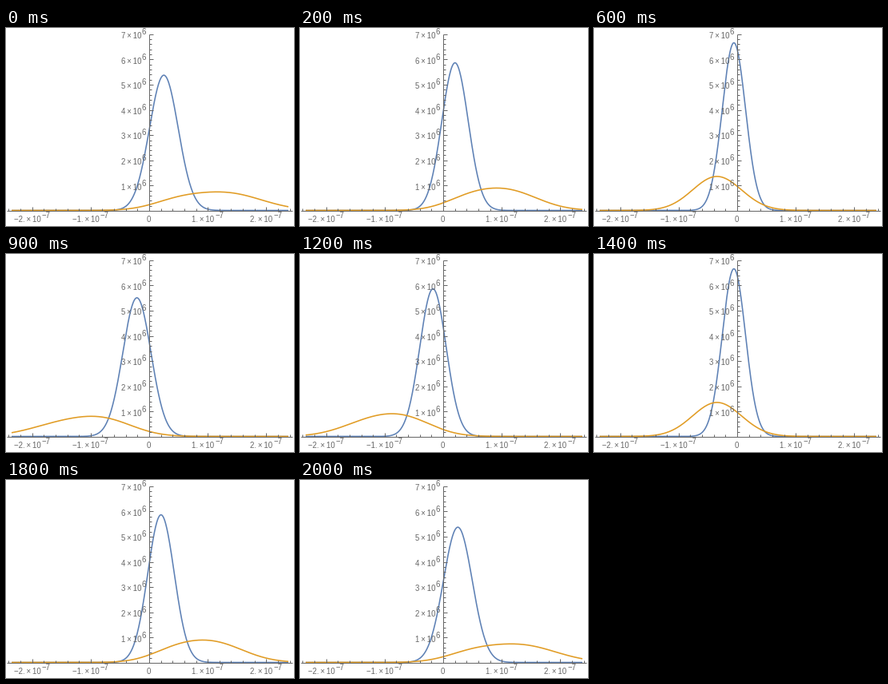
Animation, 360 px wide and 248 px high, one loop 2.1 s. Source, as a matplotlib script:

```python
import numpy as np
import matplotlib.pyplot as plt
from matplotlib.animation import FuncAnimation

W, H, DPI = 360, 248, 100
PT = 72 / DPI                      # points per pixel
X0, Y0 = 179.5, 228.5              # origin of the axes
XU, YU = 73.2, 31.6                # pixels per 1e-7 and per 1e6
FRAMES, STEP = 21, 100
GRAY, BLUE, GOLD = "#666666", "#5e81b5", "#e19c24"
THIN = "\u2009"

plt.rcParams["font.family"] = "Liberation Sans"
fig = plt.figure(figsize=(W / DPI, H / DPI), dpi=DPI, facecolor="white")
ax = fig.add_axes([0, 0, 1, 1])
ax.set(xlim=(0, W), ylim=(H, 0))
ax.axis("off")


def rule(xs, ys):
    """Draw a line one pixel wide, aligned to whole pixels."""
    ax.plot(np.floor(xs), np.ceil(ys), color=GRAY, lw=PT, zorder=3,
            snap=True, solid_capstyle="butt")


def label(x, y, text, align="left"):
    ax.text(x, y, text, size=9.7 * PT, color=GRAY, ha=align,
            va="baseline", zorder=4)


def power(x, y, mantissa, exponent):
    """Write mantissa x 10^exponent, with the mantissa ending at x."""
    label(x, y, f"{mantissa}{THIN}×{THIN}10", "right")
    label(x + 0.8, y - 5, exponent)


def draw_axes():
    rule([1, 358], [Y0, Y0])
    rule([X0, X0], [8, Y0])
    for i in range(-12, 13):
        x = X0 + i * XU / 5
        rule([x, x], [Y0, Y0 - (5 if i % 5 == 0 else 3)])
    for i in range(1, 36):
        y = Y0 - i * YU / 5
        rule([X0, X0 + (5 if i % 5 == 0 else 3)], [y, y])
    for n in range(1, 8):
        power(169, Y0 - n * YU + 5.7, n, "6")
    for n in (-2, -1, 1, 2):
        sign = "\u2212" if n < 0 else ""
        power(X0 + n * XU + (10.7 if n < 0 else 7.7), 242.7,
              f"{sign}{abs(n)}.", "\u22127")
    label(X0 - 0.8, 242.7, "0", "center")


def bell(x, area, mid, sd):
    return area / sd * np.exp(-((x - mid) / sd) ** 2 / 2)


def narrow(x, c):
    u = c * c
    height = 6.78 - 1.42 * u
    return bell(x, 96.5, c * (16.5 + 0.8 * u), 96.5 / height)


def wide(x, c):
    """Two packets that spread apart towards the turning points."""
    u = c * c
    area = 41.2 - 2 * u
    inner = 0.34 - 0.1 * c
    return (bell(x, area * (1 - inner), 103.5 * c - 7.5 * u, 27.5 + 16.5 * u)
            + bell(x, area * inner, 44 * c - 11 * u, 28 + 6 * u - 2 * c))


draw_axes()
xs = np.linspace(-173, 173, 693)
style = dict(lw=1.6 * PT, solid_capstyle="butt", solid_joinstyle="round")
blue, = ax.plot([], [], color=BLUE, zorder=1, **style)
gold, = ax.plot([], [], color=GOLD, zorder=2, **style)


def update(k):
    c = np.cos(2 * np.pi * k / (FRAMES - 1))
    for line, curve in ((blue, narrow), (gold, wide)):
        line.set_data(xs + X0 + 0.5, Y0 - YU * curve(xs, c))
    return blue, gold


anim = FuncAnimation(fig, update, frames=FRAMES, interval=STEP,
                     repeat=True, repeat_delay=0, blit=False)
plt.show()
```
